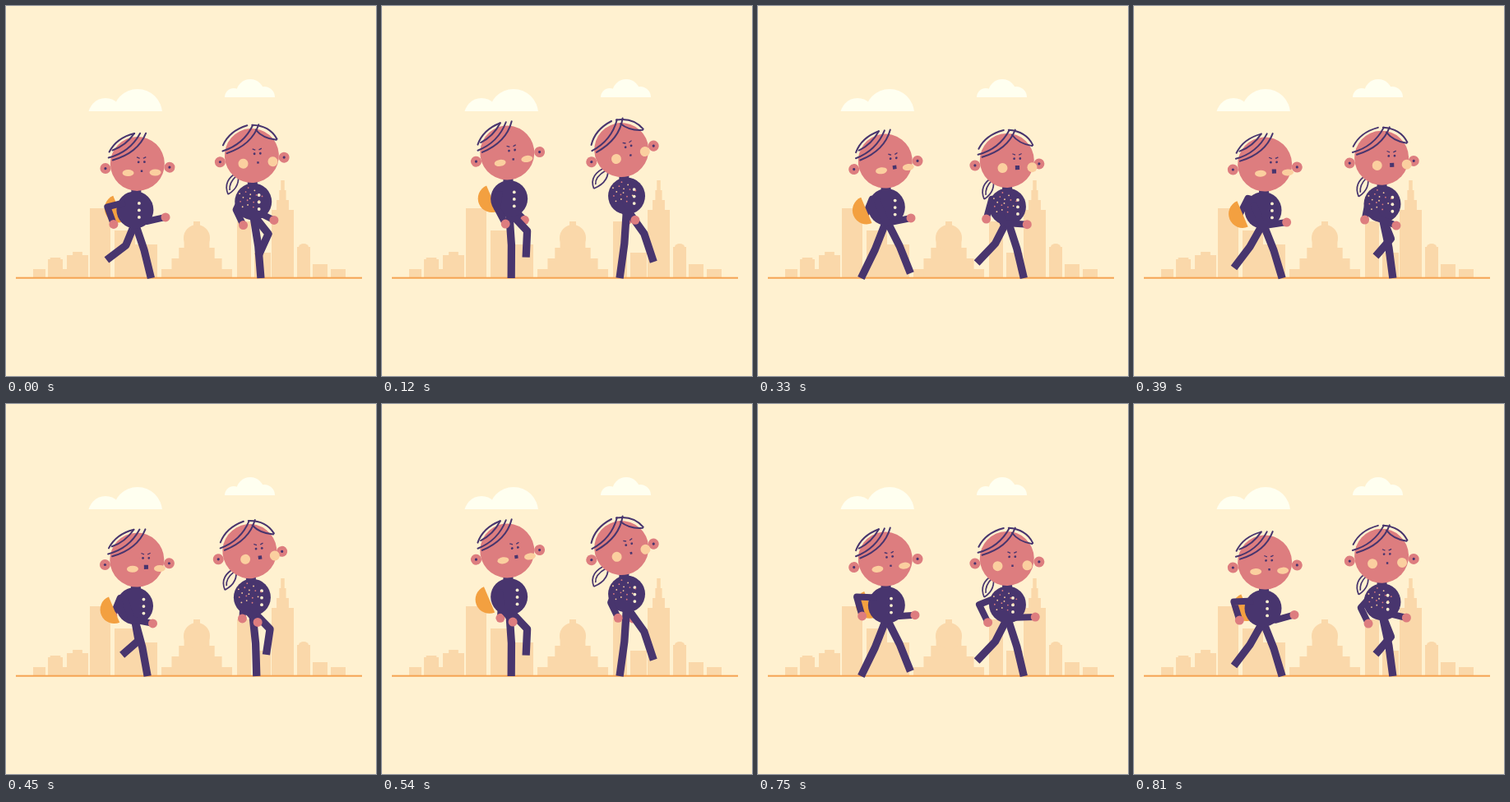
These frames come from a looping animation (450x450 px, 0.84 s). An HTML page with a canvas:

```html
<!DOCTYPE html>
<html lang="en">
<head>
<meta charset="utf-8">
<title>Walking pair</title>
<style>
html, body { margin: 0; width: 100%; height: 100%; overflow: hidden; background: #fff1d0; }
canvas { display: block; width: 450px; height: 450px; }
</style>
</head>
<body>
<canvas id="stage" width="450" height="450"></canvas>
<script>
const ctx = document.getElementById('stage').getContext('2d');
const LOOP = 840, STRIDE = LOOP / 2, STEP = 30, TAU = Math.PI * 2, GROUND = 331;
const SKY = '#fff1d0', CITY = '#fad8aa', CLOUD = '#fffff0', LINE = '#f5a352';
const INK = '#48356e', SKIN = '#dd7d7f', BLUSH = '#fbcf9f', BAG = '#f3a040';

// Both people share one gait; lead is how far (in ms) a person is ahead in it.
const man = { x: 155.5, y: 239.5, sway: 1.5, bob: 9, feet: 157, lead: 0, arm: 30, armLift: 18,
  nod: 5, lean: -2, look: 8, cheek: [16.5, 11, 7, 4], bag: true };
const woman = { x: 300.5, y: 237.5, sway: 3, bob: 6.5, feet: 302, lead: 75, arm: 26, armLift: 11,
  nod: 3, lean: -3.5, look: 9.5, cheek: [18, 9, 6, 6], tail: true };

const wave = (t, period) => Math.cos(TAU * t / period);
const mix = (a, b, u) => a + (b - a) * u;
const smooth = u => u * u * (3 - 2 * u);
const wrap = t => (t % LOOP + LOOP) % LOOP;

function ellipse(x, y, rx, ry, color) {
  ctx.fillStyle = color;
  ctx.beginPath();
  ctx.ellipse(x, y, rx, ry, 0, 0, TAU);
  ctx.fill();
}
const dot = (x, y, r, color) => ellipse(x, y, r, r, color);

function curves(width, ...parts) {
  ctx.strokeStyle = INK;
  ctx.lineWidth = width;
  ctx.beginPath();
  for (const [x, y, ...rest] of parts) {
    ctx.moveTo(x, y);
    ctx.quadraticCurveTo(...rest);
  }
  ctx.stroke();
}

// Two segments whose joint is pushed sideways by bend.
function limb(x, y, ex, ey, bend, width) {
  const dx = ex - x, dy = ey - y, len = Math.hypot(dx, dy) || 1;
  ctx.strokeStyle = INK;
  ctx.lineWidth = width;
  ctx.lineJoin = 'round';
  ctx.lineCap = 'butt';
  ctx.beginPath();
  ctx.moveTo(x, y);
  ctx.lineTo((x + ex) / 2 + dy / len * bend, (y + ey) / 2 - dx / len * bend);
  ctx.lineTo(ex, ey);
  ctx.stroke();
}

// The foot snaps forward with an ease-out, then slides back on the ground.
function leg(hipX, hipY, centre, t) {
  const FRONT = 30, BACK = -36, SNAP = 280;
  const since = wrap(t - 418);
  const x = since < SNAP
    ? mix(FRONT, BACK, (1 - since / SNAP) ** 3)
    : mix(FRONT, BACK, smooth((since - SNAP) / (LOOP - SNAP)));
  const air = Math.min(1, wrap(t - 380) / 430);
  const lift = Math.sin(Math.PI * Math.sqrt(air));
  limb(hipX, hipY, centre + x, GROUND - 27 * lift, 1.5 + 14 * lift ** 4, 9.3);
}

function arm(x, y, handX, handY, bend) {
  limb(x, y, handX, handY, bend, 8);
  dot(handX, handY, 5.5, SKIN);
}

function cloud(base, ...circles) {
  ctx.save();
  ctx.beginPath();
  ctx.rect(0, 0, 450, base);
  ctx.clip();
  for (const c of circles) dot(...c, CLOUD);
  ctx.restore();
}

function block(x, width, top) {
  ctx.fillStyle = CITY;
  ctx.fillRect(x, top, width, 330 - top);
}

// Storeys that narrow by a fixed ratio.
function stepped(cx, half, ratio, top, rise, count) {
  for (let k = 0; k < count; k++, half *= ratio, top -= rise) block(cx - half, half * 2, top);
}

function scenery() {
  ctx.fillStyle = SKY;
  ctx.fillRect(0, 0, 450, 450);
  cloud(128, [121, 133, 21], [160, 131, 30]);
  cloud(111, [277, 111, 11], [297, 106, 17], [314, 111, 13]);
  block(33, 15, 320);
  stepped(60, 9, 0.7, 308, 2, 2);
  block(69, 5, 320);
  stepped(87, 13, 0.45, 303, 4, 2);
  block(102, 25, 246);
  block(132, 25, 273);
  block(157, 27, 290);
  stepped(232, 43, 0.71, 320, 13, 4);
  dot(232, 282, 16, CITY);
  block(228, 8, 262);
  block(281, 17, 262);
  block(302, 20, 300);
  stepped(336.5, 13.5, 0.55, 248, 12, 4);
  block(354, 16, 293);
  ellipse(362, 293, 6, 4, CITY);
  block(373, 18, 314);
  block(395, 18, 320);
  ctx.fillStyle = LINE;
  ctx.fillRect(12, 329.7, 421, 2);
}

function ponytail(x, y, tilt) {
  const tip = -27 + tilt * 0.45;
  const sides = [[-17, 20, tip - 7, 30, tip, 47], [tip, 47, -13, 38, -17, 20]];
  ctx.save();
  ctx.translate(x, y);
  ctx.fillStyle = SKY;
  ctx.beginPath();
  ctx.moveTo(-17, 20);
  for (const s of sides) ctx.quadraticCurveTo(...s.slice(2));
  ctx.fill();
  curves(1.7, ...sides, [-19, 25, tip + 1, 33, tip + 2, 42]);
  ctx.restore();
}

function head(p, x, y, tilt, shift, mouth) {
  if (p.tail) ponytail(x, y, tilt);
  ctx.save();
  ctx.translate(x, y);
  ctx.rotate(tilt * Math.PI / 180);
  dot(0, 0, 33, SKIN);
  const [cx, cy, rx, ry] = p.cheek;
  for (const side of [-1, 1]) {
    const eye = shift + side * 3.6;
    dot(side * 39, 5, 6.5, SKIN);
    dot(side * 39, 5, 1.6, INK);
    ellipse(shift + side * cx, cy, rx, ry, BLUSH);
    dot(eye, -2, 1.4, INK);
    curves(1.3, [eye + side * 2, -8, eye, -7, eye - side * 1.5, -6.5]);
  }
  ctx.fillStyle = INK;
  ctx.fillRect(shift - mouth, 9 - mouth, mouth * 2, mouth * 2);

  ctx.lineCap = 'round';
  curves(2, [-34, -15, -25, -32, -3, -37], [-35, -8, -9, -14, 4, -37], [-30, -5, 1, -13, 11, -37]);
  if (p.tail) curves(2, [3, -37, 24, -35, 32, -18], [7, -31, 15, -20, 31, -17]);
  else curves(2, [-30, -17, -14, -22, -3, -37]);
  ctx.restore();
}

function person(p, time) {
  const t = time + p.lead;
  const bounce = wave(t + 25, STRIDE), nod = wave(t - 10, STRIDE), turn = wave(t, LOOP);
  const x = p.x + p.sway * bounce, y = p.y + p.bob * bounce;
  const headX = x + p.lean + p.nod * nod, shift = p.look - 3 * turn;

  const far = wave(t + 30, LOOP);
  arm(x + 6, y - 8, x + 4 + (p.arm + 4) * far, y + 30 - (p.armLift + 4) * far ** 2, -6 - 10 * far ** 2);

  if (p.bag) {
    ctx.fillStyle = BAG;
    ctx.beginPath();
    ctx.arc(x - 22.5 + 2.5 * turn, y + 1.5 - 3 * turn, 17, 1.17, 1.17 + Math.PI);
    ctx.fill();
  }

  for (const half of [0, STRIDE]) leg(x + p.feet - p.x - 1.5, y + 16, p.feet, t + half);

  ctx.fillStyle = INK;
  ctx.fillRect((x + headX) / 2 - 6, y - 27, 12, 12);
  dot(x, y, 22.5, INK);

  const near = -wave(t + 70, LOOP);
  arm(x - 12, y - 9, x + p.arm * near, y + 31 - p.armLift * near ** 2, -6 - 14 * near ** 2);

  for (const k of [-1, 0, 1]) dot(x + shift, y + 0.5 + k * 8.5, 1.9, SKY);
  if (p.tail) {
    for (let i = 0; i < 16; i++) {
      const r = 4.2 * Math.sqrt(i), a = i * 2.4;
      dot(x - 4 + r * Math.cos(a), y - 4 + r * Math.sin(a) * 0.8, 0.9, i % 2 ? SKIN : BLUSH);
    }
  }
  head(p, headX, y - 56, -8 + 7 * nod, shift, 1.2 + 1.4 * Math.max(0, -turn));
}

function frame() {
  const t = Math.floor(performance.now() % LOOP / STEP) * STEP;
  scenery();
  person(man, t);
  person(woman, t);
  requestAnimationFrame(frame);
}
frame();
</script>
</body>
</html>
```
